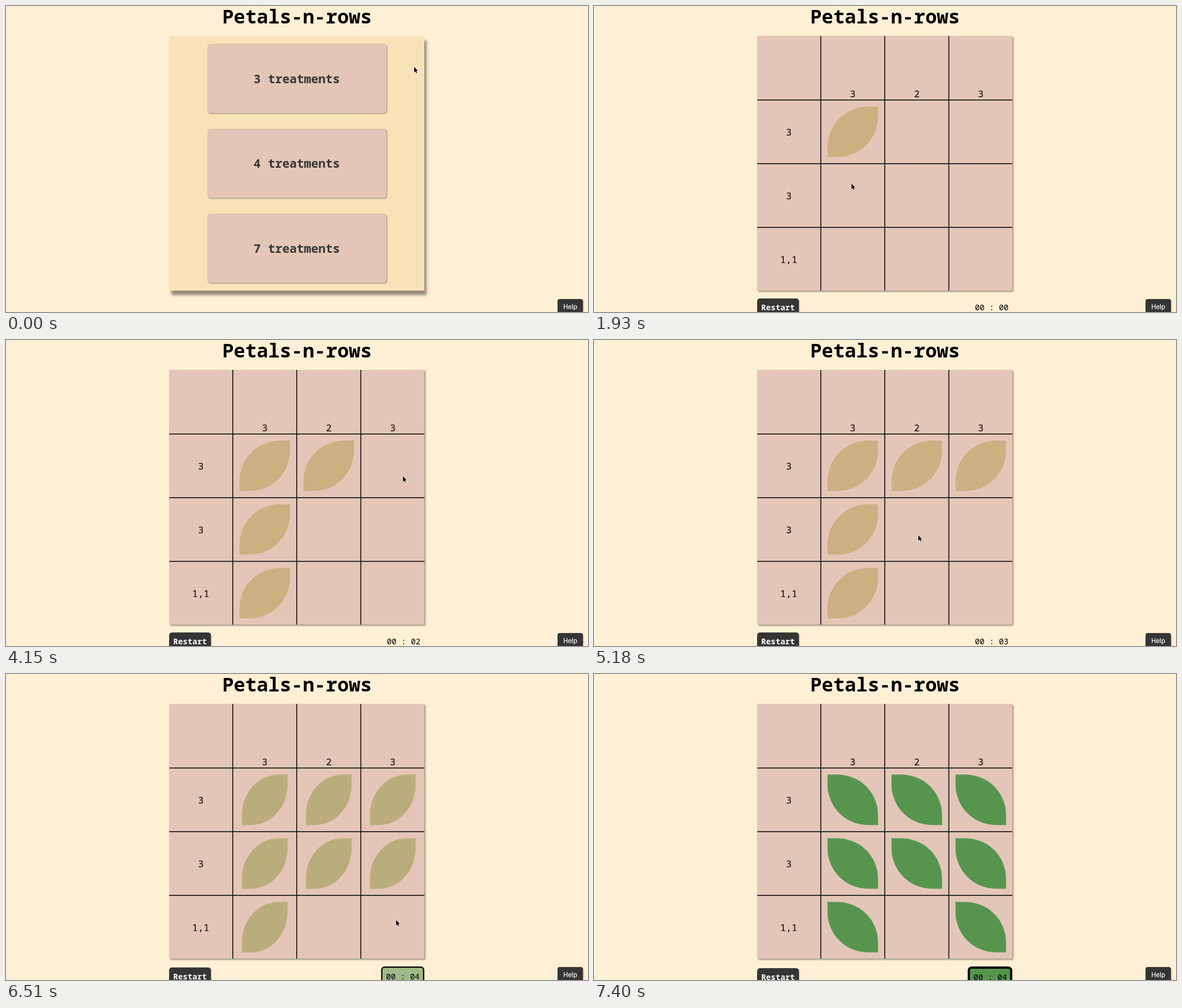
Write an HTML page that moves like this. It is 1031 by 543 pixels and loops after 8000 ms.

```html
<!DOCTYPE html>
<html lang="en">
<head>
<meta charset="utf-8">
<title>Leaf puzzle</title>
<style>
  html, body { margin: 0; width: 100%; height: 100%; overflow: hidden; background: #fff0d5; }
  svg { display: block; width: 100%; height: 100%; }
  text { font-family: "Noto Sans Mono", "DejaVu Sans Mono", monospace; text-anchor: middle; }
  .title { font-size: 34px; font-weight: 700; }
  .option { font-size: 21.25px; font-weight: 600; fill: #353535; }
  .clue { font-size: 17px; }
  .small { font-size: 14.17px; font-weight: 600; }
  .timer { font-size: 14.17px; font-weight: 500; }
  .help { font: 500 11.2px Inter, "Liberation Sans", sans-serif; }
  .menu { filter: drop-shadow(4px 8px 2.5px rgba(0, 0, 0, .42)); }
  .card { filter: drop-shadow(1.5px 1.5px 1px rgba(0, 0, 0, .42)); }
  .board { filter: drop-shadow(2px 2px 1.7px rgba(0, 0, 0, .4)); }
  .key { filter: drop-shadow(1px 1px .8px rgba(0, 0, 0, .3)); }
</style>
</head>
<body>
<svg id="stage" viewBox="0 0 1031 543" preserveAspectRatio="none"></svg>
<script>
const LOOP = 8000, STEP = 148;
const LINE_X = 401.7, LINE_Y = 166.75, COL = 113.4, ROW = 113;
const GOLD = [203, 177, 130], GREEN = [87, 149, 79];
const SIZE = 89.5, RADIUS = SIZE * 0.8;

function add(parent, tag, attrs = {}, text) {
  const el = document.createElementNS("http://www.w3.org/2000/svg", tag);
  set(el, attrs);
  if (text) el.textContent = text;
  parent.appendChild(el);
  return el;
}
function set(el, attrs) {
  for (const name in attrs) el.setAttribute(name, attrs[name]);
}
const label = (parent, cls, x, y, text, fill = "#000") =>
  add(parent, "text", { class: cls, x, y, fill }, text);
const rect = (parent, x, y, width, height, fill, extra) =>
  add(parent, "rect", { x, y, width, height, fill, ...extra });

const stage = document.getElementById("stage");
rect(stage, 0, 0, 1031, 543, "#fff0d5");
label(stage, "title", 515.5, 30.5, "Petals-n-rows");

// Start menu
const menu = add(stage, "g");
rect(menu, 289, 53, 452, 452, "#f8e3b9", { class: "menu" });
[3, 4, 7].forEach((n, i) => {
  const y = 67.5 + i * 150.6;
  rect(menu, 357, y, 317, 122.5, "#e3c6b7", { rx: 5, class: "card" });
  label(menu, "option", 515, y + 69, n + " treatments");
});

// Puzzle board
const game = add(stage, "g");
rect(game, 289, 53, 452, 452, "#e3c6b7", { class: "board" });
["3", "3", "1,1"].forEach((clue, i) => {
  const x = LINE_X + i * COL, y = LINE_Y + i * ROW;
  add(game, "path", { d: `M${x} 53V505M289 ${y}H741`, stroke: "#000", "stroke-width": 1.5 });
  label(game, "clue", x + COL / 2, 162, "323"[i]);
  label(game, "clue", 345, y + 63.3, clue);
});

// Pointer stops: arrival in steps, x, y. Each stop on an empty cell plants a leaf.
const stops = [
  [0, 722.5, 107.5], [4, 628, 156],
  [10, 458.5, 219.5], [15, 455, 338], [18, 450.5, 464.5],
  [25.5, 572, 246], [28, 702.5, 241], [35, 574, 346],
  [39, 700, 350], [42.5, 690.5, 436],
  [48, 911, 460]
];
const GLIDE = 3, CLICK_LAG = 1.5;

const h = SIZE / 2, e = h - RADIUS;
const arc = `A${RADIUS} ${RADIUS} 0 0 1`;
const leafPath = `M${-h} ${h}V${-e}${arc} ${-e} ${-h}H${h}V${e}${arc} ${e} ${h}Z`;
const leaves = stops.slice(2, -1).map(([k, x, y]) => ({
  x: LINE_X + COL * (Math.floor((x - LINE_X) / COL) + 0.5),
  y: LINE_Y + ROW * (Math.floor((y - LINE_Y) / ROW) + 0.5),
  start: (k + CLICK_LAG) * STEP,
  el: add(game, "path", { d: leafPath })
}));
const firstLeaf = leaves[0], lastLeaf = leaves[leaves.length - 1];
const winTime = lastLeaf.start - STEP;

const restart = add(game, "g");
rect(restart, 289, 519, 74, 40, "#353535", { rx: 5, class: "key" });
label(restart, "small", 326, 540, "Restart", "#fff");
const timerBox = rect(game, 668, 519, 73, 40, "#57954f", { rx: 5, stroke: "#000" });
const timer = label(game, "timer", 704.5, 540, "00 : 00");

rect(stage, 977, 520, 45, 40, "#353535", { rx: 4, class: "key" });
label(stage, "help", 999.5, 537.5, "Help", "#fff");

const cursor = add(stage, "path", {
  d: "M.5 .5V10.5L2.7 8.3L4.2 11.8L5.7 11.1L4.2 7.8H7.2Z",
  stroke: "#fff", "stroke-width": 1.1, "paint-order": "stroke", "stroke-linejoin": "round"
});

const progress = (t, start, length) => Math.min(1, Math.max(0, (t - start) / length));
const mix = (a, b, f) => a + (b - a) * f;
const settle = f => 1 - (1 - f) ** 4;

// The CSS "ease" curve
function ease(x) {
  const bez = (a, b, s) => 3 * a * s * (1 - s) ** 2 + 3 * b * s * s * (1 - s) + s ** 3;
  let lo = 0, hi = 1;
  for (let i = 0; i < 20; i++) {
    const mid = (lo + hi) / 2;
    if (bez(0.25, 0.25, mid) < x) lo = mid; else hi = mid;
  }
  return bez(0.1, 1, hi);
}

// The pointer rests at each stop, then glides to the next one.
function pointAt(k) {
  let [, x, y] = stops[0];
  for (let i = 1; i < stops.length; i++) {
    const [arrive, nextX, nextY] = stops[i];
    const length = Math.min(GLIDE, arrive - stops[i - 1][0]);
    const f = settle(progress(k, arrive - length, length));
    x = mix(x, nextX, f);
    y = mix(y, nextY, f);
  }
  return [x, y];
}

function drawLeaf(leaf, t) {
  const last = leaf === lastLeaf;
  const flip = ease(progress(t, last ? leaf.start : winTime + 84, 500));
  const shown = last ? flip : progress(t, leaf.start, 150);
  const angle = Math.PI / 2 * (last ? 1 + flip : 1 - shown + 2 * flip);
  const color = GOLD.map((c, i) => Math.round(mix(c, GREEN[i], flip)));
  set(leaf.el, {
    transform: `translate(${leaf.x} ${leaf.y}) scale(${Math.cos(angle)} 1)`,
    fill: `rgb(${color})`,
    opacity: shown
  });
}

function draw(ms) {
  // Motion advances in even steps, like a screen capture.
  const k = Math.floor((ms + 14) / STEP), t = k * STEP;
  const playing = k > stops[1][0];
  menu.setAttribute("display", playing ? "none" : "inline");
  game.setAttribute("display", playing ? "inline" : "none");
  leaves.forEach(leaf => drawLeaf(leaf, t));

  const win = ease(progress(t, winTime, 450));
  const border = 4 * win, left = 668 - 6 * win;
  restart.setAttribute("transform", `translate(0 ${3 * win})`);
  set(timerBox, {
    x: left + border / 2, y: 519 + border / 2, width: 741 - left - border,
    "fill-opacity": win, "stroke-width": border
  });
  set(timer, { x: 704.5 - 2.5 * win, y: 540 + 3 * win });
  const played = Math.min(t, winTime) - firstLeaf.start;
  timer.textContent = "00 : 0" + Math.max(0, Math.floor(played / 1000));

  set(cursor, {
    transform: `translate(${pointAt(k)})`,
    display: k < 50 ? "inline" : "none"
  });
}

const begin = performance.now();
function tick() {
  draw((performance.now() - begin) % LOOP);
  requestAnimationFrame(tick);
}
tick();
</script>
</body>
</html>
```
